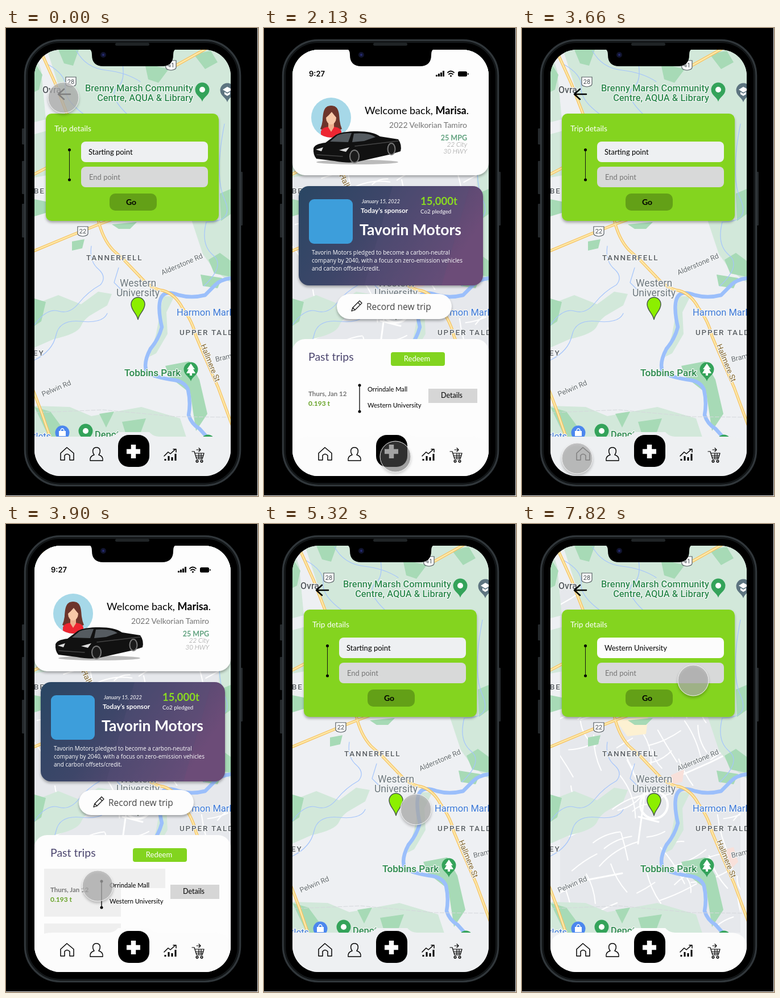
An HTML page that plays this animation: 443x820 px, repeating every 8 s.

```html
<!DOCTYPE html>
<html lang="en">
<head>
<meta charset="utf-8">
<title>Trip recorder</title>
<style>
html, body { margin: 0; height: 100%; overflow: hidden; background: #000; }
svg { display: block; width: 100vw; height: 100vh; font-family: Lato, sans-serif; }
.line { fill: none; stroke-linecap: round; stroke-linejoin: round; }
.map { font-family: Roboto, sans-serif; }
.body { font-family: "Open Sans", sans-serif; }
.halo text { paint-order: stroke; stroke: #f4f6f6; stroke-width: 2.5px; stroke-linejoin: round; }
.caps { font-size: 13.5px; font-weight: 500; letter-spacing: 1.8px; fill: #5b6066; }
.mid { text-anchor: middle; }
.end { text-anchor: end; }
.bold { font-weight: 700; }
.lift { filter: drop-shadow(0 3px 2px rgba(0,0,0,.3)); }
</style>
</head>
<body>
<svg viewBox="0 0 443 820" preserveAspectRatio="none">
<defs>
  <clipPath id="screen"><rect x="50" y="38" width="345" height="747" rx="46"/></clipPath>
  <clipPath id="mapArea"><rect x="50" y="38" width="345" height="678"/></clipPath>
  <clipPath id="detailArea"><rect x="67" y="112" width="317" height="652"/></clipPath>
  <linearGradient id="night" x2="1" y2=".35">
    <stop stop-color="#294663"/><stop offset=".45" stop-color="#3e4669"/><stop offset="1" stop-color="#6c4c78"/>
  </linearGradient>
  <path id="drop" d="M0 19C-2 11-12.500 8-12.500-2A12.500 12.500 0 1 1 12.500-2C12.500 8 2 11 0 19Z"/>
  <path id="shield" d="M-9-8H9V4Q9 8 0 9Q-9 8-9 4Z" fill="#fff" stroke="#555c62" stroke-width="1.200"/>
  <path id="richmond" d="M58 34L87 98L114 168L162 336Q170 370 188 389L208 407L234 434Q254 457 276 460Q297 466 310 490Q328 514 334 540L345 566L373 630L398 698"/>
  <path id="highway" d="M48 391L118 362L166 343L240 316"/>
  <path id="west" d="M46 630L62 672L80 724M48 257L75 243M300 65L352 36"/>
</defs>

<!-- phone body -->
<g fill="#24292c">
  <rect x="28" y="176" width="5" height="28" rx="1"/><rect x="28" y="233" width="5" height="58" rx="1"/>
  <rect x="28" y="308" width="5" height="59" rx="1"/><rect x="411" y="252" width="5" height="94" rx="1"/>
</g>
<rect x="33.500" y="21.500" width="378" height="780" rx="62" fill="#000" stroke="#30363a" stroke-width="3.500"/>
<rect x="37" y="25" width="371" height="773" rx="58" fill="none" stroke="#15191b" stroke-width="2"/>
<rect x="192" y="26" width="60" height="5" rx="2.500" fill="#202426"/>

<g clip-path="url(#screen)">
  <rect x="50" y="38" width="345" height="747" fill="#eef0f3"/>
  <g id="map" class="map" clip-path="url(#mapArea)">
    <g id="detail">
      <rect x="50" y="38" width="345" height="690" fill="#e6e8ec"/>
      <path id="streets" class="line" stroke="#fff" stroke-width="2"/>
      <path class="line" stroke="#fff" stroke-width="3" d="M50 654L112 624L176 612M262 448L330 418L395 386M216 470L204 560M205 513L240 522"/>
      <circle cx="232" cy="492" r="24" fill="none" stroke="#fff" stroke-width="4"/>
      <path d="M165 344L222 336L218 368L185 372Z" fill="#fdf1d2"/>
      <path d="M262 440L285 430L282 452L264 456ZM358 570L372 566L380 592L368 604Z" fill="#f8e0da"/>
    </g>
    <g fill="#d2e8da">
      <path d="M72 38H395V155H110Z"/>
      <path d="M50 38L62 75L70 160L50 165ZM50 186L72 180V258L50 262Z"/>
      <path d="M374 150H395V446L366 424L346 396L326 336H374Z"/>
      <path d="M50 484L92 468L132 484L162 462L186 466L178 486L154 500Q138 508 132 522T84 545L50 560Z"/>
      <path d="M50 662L112 664L150 680L238 664L306 684L318 720H50Z"/>
      <path d="M276 470L296 470L282 498L284 536L264 570L252 576L264 536Z"/>
    </g>
    <g fill="#a7dab6">
      <path d="M92 38H128L118 66L102 62ZM50 60L64 82L58 108L50 112ZM244 62L286 72L268 96L250 90Z"/>
      <path d="M330 46L360 40L372 60L350 72ZM376 290L395 282V326L378 338ZM356 406L376 394L395 408V436L366 430Z"/>
      <path d="M116 374L138 370L134 386L116 390ZM186 344L230 340L218 352L198 352Z"/>
      <path d="M50 474L70 480L62 514L50 522ZM342 432L380 438L372 456L346 452Z"/>
      <path d="M280 592L322 584L340 616L354 676L334 706L324 640L288 612Z"/>
      <path d="M50 664L78 672L112 718H76ZM164 676L190 672L176 700ZM204 690L246 684L234 716L212 716ZM50 300L70 304V324L50 330Z"/>
    </g>
    <g class="line" stroke="#a5c5fb" stroke-width="1.200">
      <path d="M50 520Q72 490 92 496T128 482T166 450Q178 436 162 422T150 382"/>
      <path d="M50 582Q82 566 88 538T132 514T178 500M210 466L190 446L198 420"/>
      <path d="M74 64Q106 82 104 104T138 152M200 42Q214 90 196 104T214 152M384 168Q366 260 384 300T352 340Q342 380 364 398T348 452"/>
      <path d="M124 40Q140 70 176 74T236 94"/>
    </g>
    <path class="line" stroke="#9bbffb" stroke-width="6.500" d="M398 438Q378 440 368 450T350 468Q326 474 304 468Q278 458 272 474T274 524Q268 546 254 562Q240 588 248 604Q264 612 290 616Q314 618 320 634Q325 656 321 678Q326 694 340 702L360 724"/>
    <path class="line" stroke="#d5d8dc" stroke-width="1" d="M50 674L170 669L300 681L395 682" stroke-dasharray="7 3"/>
    <g class="line" stroke="#f6c15f" stroke-width="5"><use href="#richmond"/><use href="#highway"/><use href="#west"/></g>
    <g class="line" stroke="#fde8a8" stroke-width="2.600"><use href="#richmond"/><use href="#highway"/><use href="#west"/></g>

    <g class="mid" font-size="11" fill="#444b50">
      <use href="#shield" x="114" y="94"/><text x="114" y="98">28</text>
      <use href="#shield" x="290" y="65"/><text x="290" y="69">41</text>
      <use href="#shield" x="135" y="356"/><text x="135" y="360">22</text>
    </g>
    <g fill="#34a35a">
      <use href="#drop" x="345" y="110"/><use href="#drop" x="325" y="600"/>
      <use href="#drop" x="140" y="708"/><use href="#drop" x="355" y="727"/>
    </g>
    <use href="#drop" x="389" y="111" fill="#5d7480"/>
    <circle cx="99" cy="709" r="12.500" fill="#4c87ee"/>
    <g fill="#fff">
      <circle cx="345" cy="108" r="5"/><circle cx="140" cy="706" r="5"/>
      <path d="M325 588L332 598H329L333 605H327V609H323V605H317L321 598H318Z"/>
      <path d="M381 108L389 103L398 108L389 113ZM384 112L389 115L394 112V116L389 119L384 116Z"/>
      <path d="M93 706H105V715H93Z"/>
    </g>
    <path class="line" d="M96 706A3 4 0 0 1 102 706" stroke="#fff" stroke-width="1.500"/>
    <g class="halo">
      <g font-size="16.400" fill="#2c8a4d" font-weight="500">
        <text class="end" x="329" y="111">Brenny Marsh Community</text>
        <text class="end" x="329" y="128">Centre, AQUA &amp; Library</text>
        <text x="208" y="610" font-size="17">Tobbins Park</text>
        <text x="156" y="718">Depot</text>
      </g>
      <text x="64" y="114" font-size="16" fill="#555b60" font-weight="500">Ovra</text>
      <g class="caps">
        <text x="141" y="407">TANNERFELL</text>
        <text x="305" y="538">UPPER TALDEN</text>
        <text x="49" y="290">BE</text><text x="48" y="574">EY</text>
      </g>
      <g class="mid" font-size="17.500" fill="#6e787f">
        <text x="232" y="453">Western</text><text x="232" y="470">University</text>
      </g>
      <g font-size="16.500" fill="#3c78d8">
        <text x="300" y="504">Harmon Market</text><text x="47" y="721">tlets</text>
      </g>
      <g font-size="12.500" fill="#666c72">
        <text transform="translate(275 433) rotate(-23)">Alderstone Rd</text>
        <text transform="translate(65 646) rotate(-23)">Pelwin Rd</text>
        <text transform="translate(369 585) rotate(-13)">Bramley</text>
      </g>
      <text transform="translate(342 556) rotate(68)" font-size="13.500" fill="#82652e">Hallmere St</text>
      <text id="northLabel" transform="translate(132 258) rotate(65)" font-size="14" fill="#82652e">Hall</text>
    </g>
    <path d="M232 511C230 500 220 495 220 484A12 12 0 1 1 244 484C244 495 234 500 232 511Z" fill="#8cef00" stroke="#48594a" stroke-width="1.500"/>
  </g>

  <g id="tripForm">
    <path class="line" d="M113 116H93M102 107L92 116L102 125" stroke="#000" stroke-width="2.500"/>
    <rect class="lift" x="70" y="150" width="304" height="188" rx="10" fill="#84d41f"/>
    <text x="85" y="181" font-size="13.700" fill="#fff">Trip details</text>
    <path d="M111.500 213V266" stroke="#111"/>
    <circle cx="111.500" cy="213.500" r="2.500"/><circle cx="111.500" cy="266" r="2.500"/>
    <rect id="startField" x="132" y="199" width="223" height="36" rx="8"/>
    <rect x="132" y="243" width="223" height="36" rx="8" fill="#d8d9d9"/>
    <text id="startText" x="145" y="222" font-size="13"></text>
    <text x="146" y="266" font-size="13" fill="#777">End point</text>
    <rect x="182" y="290" width="83" height="30" rx="10" fill="#63a017"/>
    <text class="mid bold" x="220" y="310" font-size="14">Go</text>
  </g>

  <g id="home">
    <rect class="lift" x="50" y="0" width="345" height="258" rx="22" fill="#fdfdfd"/>
    <text x="79" y="85" font-size="13" font-weight="600" style="font-family:Inter,sans-serif">9:27</text>
    <path d="M302 82h3v3h-3zM306 80h3v5h-3zM310 78h3v7h-3zM314 75h3v10h-3z"/>
    <path class="line" d="M323 78Q328 73 334 78M325 81Q328 78 332 81" stroke="#000" stroke-width="1.800"/>
    <circle cx="328.500" cy="84" r="1.500"/>
    <rect x="341" y="76" width="16" height="9" rx="2.500"/><rect x="358" y="79" width="1.500" height="3"/>

    <clipPath id="avatar"><circle cx="118" cy="157" r="35"/></clipPath>
    <g clip-path="url(#avatar)">
      <rect x="83" y="122" width="70" height="70" fill="#a6d8e8"/>
      <path d="M118 136C104 136 104 150 103 162Q102 170 99 177Q118 185 137 177Q134 170 133 162C132 150 132 136 118 136Z" fill="#6d352b"/>
      <path d="M100 193V181Q101 175 113 173H123Q135 175 136 181V193Z" fill="#ed2632"/>
      <path d="M113 164H123V174L118 182L113 174Z" fill="#eeb28f"/>
      <ellipse cx="118" cy="157" rx="9" ry="12" fill="#f8c9a8"/>
      <path d="M108 158Q108 145 118 143Q128 145 128 158Q122 151 119 147Q114 153 108 158Z" fill="#6d352b"/>
    </g>
    <ellipse cx="164" cy="235" rx="72" ry="4" fill="#bbb"/>
    <path d="M87 211Q89 203 108 201L124 189Q132 182 158 181Q190 180 204 190L236 195Q243 205 240 216L224 221L166 234Q150 238 124 233L92 229Q86 222 87 211Z" fill="#111"/>
    <path d="M116 199L129 188Q138 184 154 184L148 200ZM158 185Q184 183 196 191L176 198L155 200Z" fill="#555b60"/>
    <path d="M91 213L104 209L101 216ZM132 214L150 209L144 217Z" fill="#ddd"/>
    <path class="line" d="M93 222L138 225M160 207L236 198" stroke="#444" stroke-width="1.500"/>
    <g fill="#1b1b1b" stroke="#777" stroke-width="2"><ellipse cx="159" cy="225" rx="8" ry="11"/><ellipse cx="224" cy="212" rx="6.500" ry="10"/></g>

    <g class="end">
      <text x="360" y="151" font-size="18">Welcome back, <tspan class="bold">Marisa</tspan>.</text>
      <text x="357" y="175" font-size="14" fill="#747474">2022 Velkorian Tamiro</text>
      <text class="bold" x="357" y="197" font-size="12.500" fill="#61a27f">25 MPG</text>
      <g font-size="11.500" font-style="italic" font-weight="300" fill="#888">
        <text x="357" y="208">22 City</text><text x="357" y="219.500">30 HWY</text>
      </g>
    </g>

    <rect class="lift" x="61" y="277" width="324" height="174" rx="18" fill="url(#night)"/>
    <path d="M226 277H362L312 451H176Z" fill="#575078" opacity=".3"/>
    <rect x="79" y="300" width="77" height="78" rx="9" fill="#3d9edb"/>
    <g fill="#fff">
      <text x="172" y="307" font-size="9" font-style="italic">January 15, 2022</text>
      <text class="bold" x="170" y="324" font-size="11.800">Today’s sponsor</text>
      <text class="bold" x="275" y="310" font-size="18.500" fill="#8bdc20">15,000t</text>
      <text x="275" y="325" font-size="9.800">Co2 pledged</text>
      <text class="bold" x="168" y="363" font-size="26.500">Tavorin Motors</text>
      <g class="body" font-size="10">
        <text x="84" y="397">Tavorin Motors pledged to become a carbon-neutral</text>
        <text x="84" y="411">company by 2040, with a focus on zero-emission vehicles</text>
        <text x="84" y="425">and carbon offsets/credit.</text>
      </g>
    </g>

    <rect class="lift" x="128" y="466" width="202" height="44" rx="22" fill="#fdfdfd"/>
    <path class="line" d="M154 496L156 490L168 478L172 482L160 494ZM165 481L169 485M156 490L160 494" stroke="#111" stroke-width="1.300"/>
    <text class="body" x="180" y="493.500" font-size="15.500" fill="#444">Record new trip</text>

    <rect x="50" y="545" width="345" height="260" rx="22" fill="#fdfdfd"/>
    <path id="tripCards" d="M67 604H280V638H202V688H67ZM67 700H202V740H67Z" fill="#efefef"/>
    <text x="78" y="583" font-size="19.500" fill="#4c466f">Past trips</text>
    <rect x="223" y="568" width="95" height="24" rx="4" fill="#82d41f"/>
    <text class="mid" x="269" y="584" font-size="13" fill="#fff">Redeem</text>
    <text class="bold" x="78" y="645" font-size="11.500" fill="#777">Thurs, Jan 12</text>
    <text class="bold" x="78" y="662" font-size="12" fill="#67a326">0.193 t</text>
    <path d="M168 626V672" stroke="#111" stroke-width="1.400"/>
    <circle cx="168" cy="626" r="2.500"/><circle cx="168" cy="672" r="2.500"/>
    <text x="182" y="637" font-size="11.200">Orrindale Mall</text>
    <text x="182" y="665" font-size="11.200">Western University</text>
    <rect x="289" y="632" width="86" height="25" fill="#d6d6d6"/>
    <text class="mid" x="330" y="648" font-size="12.500">Details</text>
  </g>

  <path id="navBar" d="M50 785V736Q54 716 82 716H180Q190 716 197 708H252Q259 716 269 716H364Q391 716 395 736V785Z"/>
  <rect x="197" y="713" width="55" height="56" rx="19"/>
  <path d="M224 730V754M212 742H236" stroke="#fff" stroke-width="8.500"/>
  <g class="line" stroke="#000" stroke-width="1.500">
    <path d="M96 745L107 735L119 745V757H112V749Q107 744 103 749V757H96Z"/>
    <path d="M148 758Q147 750 155 748C151 742 152 735 159 735S167 742 163 748Q171 750 170 758Z"/>
    <path d="M278 750L285 743L289 746L298 738M294 738H299V743"/>
    <path d="M280 758V755M286 758V750M292 758V752M298 758V746" stroke-width="3" stroke-linecap="butt"/>
    <path d="M327 742H331L335 755H345L348 745H332M334 749H347M335 752H346M339 745V754M343 745V754M335 739H342M339 736L342 739L339 742" stroke-width="1.200"/>
    <circle cx="336" cy="759" r="1.800"/><circle cx="344" cy="759" r="1.800"/>
  </g>
</g>

<path d="M146 37Q151 38 151 47Q151 67 171 67H274Q294 67 294 47Q294 38 299 37Z"/>
<circle cx="171" cy="47" r="5" fill="#11142f"/><circle cx="171" cy="47" r="2" fill="#252a70"/>
<circle id="touch" class="lift" stroke="#f4f4f4"/>
<path d="M442.500 0V820M0 819.500H443" stroke="#eee"/>
</svg>

<script>
const LOOP = 8000;
const el = id => document.getElementById(id);
const show = (id, on) => el(id).setAttribute('display', on ? 'inline' : 'none');
const within = (t, from, to) => t >= from && t < to;

// Touch path: time, x, y, radius
const touchKeys = [
  [0, 101, 122, 27], [120, 101, 122, 27], [200, 100, 121, 30], [270, 101, 122, 27],
  [580, 101, 122, 27], [1240, 281, 754, 27], [1390, 281, 754, 27], [1510, 231, 751, 27],
  [2830, 231, 751, 27], [3030, 165, 773, 27], [3230, 97, 754, 27], [3780, 97, 754, 27],
  [4050, 249, 470, 27], [4650, 249, 470, 27], [4850, 267, 500, 27], [5600, 267, 500, 27],
  [6290, 325, 212, 27], [7230, 325, 212, 27], [7820, 301, 274, 27], [8000, 301, 274, 27]
];

function touchAt(t) {
  const next = touchKeys.findIndex(key => key[0] > t);
  const a = touchKeys[next - 1], b = touchKeys[next];
  const u = (t - a[0]) / (b[0] - a[0]);
  const eased = u * u * (3 - 2 * u);
  return a.map((v, i) => v + (b[i] - v) * eased);
}

// Winding residential streets
function streetPath() {
  let seed = 11, d = '';
  const random = () => (seed = seed * 16807 % 2147483647) / 2147483647;
  for (let i = 0; i < 110; i++) {
    const x = 50 + random() * 345, y = 110 + random() * 610;
    const angle = -0.4 + (random() < 0.5 ? Math.PI / 2 : 0) + (random() - 0.5) * 0.4;
    const length = 25 + random() * 55, bend = (random() - 0.5) * 28;
    const dx = Math.cos(angle) * length, dy = Math.sin(angle) * length;
    d += `M${x} ${y}q${dx / 2 - Math.sin(angle) * bend} ${dy / 2 + Math.cos(angle) * bend} ${dx} ${dy}`;
  }
  return d;
}
el('streets').setAttribute('d', streetPath());

function draw(now) {
  const t = now % LOOP;
  const home = within(t, 580, 2280) || within(t, 3780, 5000);
  const filled = t >= 6700;
  show('home', home);
  show('northLabel', home);
  show('tripForm', !home);
  show('tripCards', t >= 3780);
  show('detail', home || filled);
  el('detail').setAttribute('clip-path', home ? 'none' : 'url(#detailArea)');
  el('navBar').setAttribute('fill', home || filled ? '#fcfcfc' : '#eef0f2');
  el('startField').setAttribute('fill', filled ? '#fcfcfc' : '#eef0f2');
  el('startText').textContent = filled ? 'Western University' : 'Starting point';

  const [, x, y, r] = touchAt(t);
  const touch = el('touch');
  touch.setAttribute('cx', x);
  touch.setAttribute('cy', y);
  touch.setAttribute('r', r);
  touch.setAttribute('fill', within(t, 1510, 2830) ? 'rgba(100,100,100,.48)' : 'rgba(182,182,182,.7)');
  requestAnimationFrame(draw);
}
requestAnimationFrame(draw);
</script>
</body>
</html>
```
